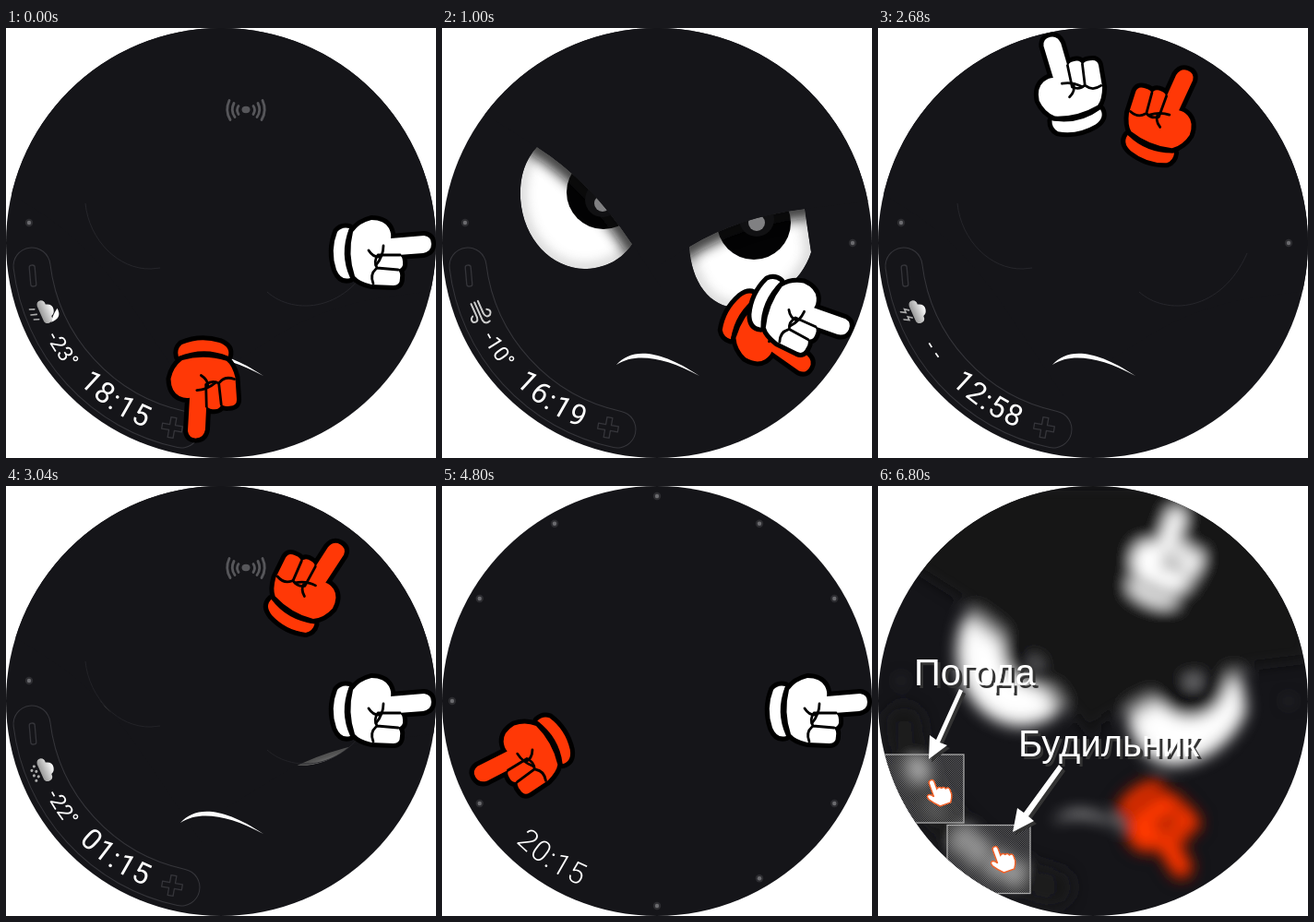
These frames come from a looping animation (466x466 px, 8.8 s). An HTML page:

```html
<!DOCTYPE html>
<html lang="ru">
<head>
<meta charset="utf-8">
<title>Watch face</title>
<style>
html, body { margin: 0; width: 100%; height: 100%; overflow: hidden; background: #fff; }
svg { display: block; width: 100vw; height: 100vh; }
.digits { font-family: Roboto, sans-serif; fill: #fff; text-anchor: middle; }
.label { font: 40px "Liberation Sans", Arial, sans-serif; }
</style>
</head>
<body>
<svg viewBox="0 0 466 466">
  <defs>
    <clipPath id="disc"><circle cx="233" cy="233" r="233" shape-rendering="crispEdges"/></clipPath>
    <filter id="soft" x="-30%" y="-30%" width="160%" height="160%"><feGaussianBlur stdDeviation="7"/></filter>
    <filter id="blur" filterUnits="userSpaceOnUse" x="0" y="0" width="466" height="466"><feGaussianBlur stdDeviation="8"/></filter>
    <linearGradient id="cloud" x2="0" y2="1"><stop offset="0" stop-color="#fff"/><stop offset="1" stop-color="#999"/></linearGradient>
    <pattern id="mesh" width="2" height="2" patternUnits="userSpaceOnUse">
      <path d="M0 0h1v1h-1zM1 1h1v1h-1z" fill="#999" fill-opacity=".6"/>
    </pattern>
    <path id="timeArc" d="M16.500 233A216.500 216.500 0 0 0 449.500 233"/>
    <path id="tempArc" d="M18 233A215 215 0 0 0 448 233"/>

    <!-- Glove pointing to twelve, around the dial centre -->
    <g id="glove" stroke="#000" stroke-linejoin="round" stroke-linecap="round">
      <g stroke-width="10" paint-order="stroke">
        <path d="M-16-139Q12-128 38-140Q41-130 29-125Q8-118-12-126Q-18-131-16-139Z"/>
        <path d="M-5-184L-8-220Q-7-228 1-228Q9-228 11-219L13-192Q14-197 20-197Q28-198 29-191Q31-195 38-194Q46-194 46-187L45-163Q42-150 36-145Q12-137-12-143Q-22-150-25-163Q-25-177-16-182Q-10-185-5-184Z"/>
      </g>
      <g fill="none" stroke-width="2.800">
        <path d="M13-194L13-170Q20-165 27-169L29-192M28-168Q34-161 44-165"/>
        <path d="M3-176Q14-176 24-168M15-173Q16-165 8-160"/>
      </g>
    </g>
    <path id="pointer" d="M-3 2V-11Q-3-14 0-14Q3-14 3-11V-3Q6-5 8-2Q11-3 12 0Q16-1 16 3V8Q15 12 12 16H0Q-5 11-9 5Q-11 1-8 0Q-5 0-3 4Z"/>
  </defs>

  <g clip-path="url(#disc)">
    <rect width="466" height="466" fill="#151519"/>
    <g id="scene">
      <g id="face">
        <g id="eyes"></g>
        <path d="M189 365C205 347 234 347 279 377C240 356 209 352 189 365Z" fill="#fff"/>
        <g fill="none" stroke-linecap="round">
          <path d="M28 258A206.500 206.500 0 0 0 190 435" stroke="#35353a" stroke-width="41"/>
          <path d="M28 258A206.500 206.500 0 0 0 190 435" stroke="#151519" stroke-width="39"/>
        </g>
        <g fill="none" stroke="#35353a" stroke-width="1.300">
          <rect x="-3" y="-11.500" width="6" height="23" rx="2.500" transform="translate(29 268.500) rotate(-5)"/>
          <path d="M-3-11h6v8h8v6h-8v8h-6v-8h-8v-6h8z" stroke-linejoin="round" transform="translate(180 433) rotate(10)"/>
        </g>
        <g id="link" fill="none" stroke="#56565a" stroke-width="2.800" stroke-linecap="round" transform="translate(260 88.500)">
          <ellipse rx="4.500" ry="3.700" fill="#56565a" stroke="none"/>
          <g id="waves"><path d="M8-4Q11 0 8 5M13-7Q17 1 12 8M18-10Q23 1 17 11"/></g>
          <use href="#waves" transform="scale(-1 1)"/>
        </g>
        <g id="weather" transform="translate(41 308) rotate(66)"></g>
        <text class="digits" font-size="23" letter-spacing=".7"><textPath id="temp" href="#tempArc" startOffset="18.900%"></textPath></text>
        <g id="sideDots"></g>
      </g>
      <g id="dots"></g>
      <text class="digits" font-size="32" letter-spacing="1.800"><textPath id="time" href="#timeArc" startOffset="31.300%"></textPath></text>
      <use id="hour" href="#glove" fill="#ff3806"/>
      <use id="minute" href="#glove" fill="#fff"/>
    </g>
    <g id="help">
      <g fill="url(#mesh)" stroke="#aaa" stroke-width="1.300">
        <rect x="-1" y="291" width="94" height="74"/>
        <rect x="75" y="367.500" width="90" height="74"/>
      </g>
      <g fill="#fff" stroke="#f0622a" stroke-width="1.500">
        <use href="#pointer" transform="translate(62 332) rotate(-20)"/>
        <use href="#pointer" transform="translate(131 404) rotate(-20)"/>
      </g>
      <g id="notes"></g>
    </g>
  </g>
</svg>
<script>
const LOOP = 8800;
const $ = id => document.getElementById(id);

// The cover is the part of the lid that slides over the eye, kept within its own half.
const eyes = [
  { shape: 'M103 129C88 145 84 165 85 185C88 230 120 262 157 261C178 260 196 250 206 234Q160 165 103 129Z',
    rim: 'M86 190C90 230 122 262 157 261L167 260', half: 'M0 0H237V466H0Z',
    lid: 'M3 66L103 129Q160 165 206 234L270 330', cover: 'L600 0L200 -200Z',
    pupil: [175, 178], glint: [174, 190], shift: [-69, 69] },
  { shape: 'M268 237C270 275 290 303 320 303C355 303 390 275 400 243L393 196Q320 205 268 237Z',
    rim: 'M283 286C312 312 372 308 400 244', half: 'M237 0H466V466H237Z',
    lid: 'M168 299L268 237Q320 205 393 196L493 184', cover: 'L493 -100L100 -100Z',
    pupil: [338, 211], glint: [341, 211], shift: [30, 94] }
];

$('eyes').innerHTML = eyes.map((e, i) => {
  const [x, y] = e.pupil, [gx, gy] = e.glint;
  return `<clipPath id="eye${i}"><path d="${e.shape}"/></clipPath>
  <clipPath id="half${i}"><path d="${e.half}"/></clipPath>
  <g clip-path="url(#eye${i})">
    <path d="${e.shape}" fill="#fff"/>
    <path d="${e.shape}" fill="none" stroke="#555" stroke-width="6" opacity=".5" filter="url(#soft)"/>
    <circle cx="${x}" cy="${y}" r="40" fill="#030304"/>
    <path id="shade${i}" d="${e.lid}" fill="none" stroke="#111" stroke-width="20" opacity=".8" filter="url(#soft)"/>
    <circle cx="${gx}" cy="${gy - 4}" r="19" fill="#111113"/>
    <circle cx="${gx}" cy="${gy}" r="9" fill="#808082"/>
  </g>
  <g clip-path="url(#half${i})"><path id="lid${i}" d="${e.lid}${e.cover}" fill="#151519"/></g>
  <path id="rim${i}" d="${e.rim}" fill="none" stroke="#26262b"/>`;
}).join('');

const dot = (x, y) => `<circle cx="${x}" cy="${y}" r="4.200" fill="#2c2c30"/><circle cx="${x}" cy="${y}" r="2.200" fill="#6a6a6e"/>`;
$('sideDots').innerHTML = dot(25, 211) + dot(445, 233);
let ring = '';
for (let h = 0; h < 12; h++) {
  const a = h * Math.PI / 6;
  if (h !== 7) ring += dot(233 + 222 * Math.sin(a), 233 - 222 * Math.cos(a));
}
$('dots').innerHTML = ring;

const note = `<text class="label" x="39" y="216">Погода</text>
  <text class="label" x="152" y="293">Будильник</text>
  <path d="M88 220L92 222L67 278L75 281L55 296L56 270L63 275Z"/>
  <path d="M196 302L200 306L163 358L169 363L146 375L151 349L158 354Z"/>`;
$('notes').innerHTML = `<g fill="#333" transform="translate(3 3)">${note}</g><g fill="#fff">${note}</g>`;

const cloud = '<path d="M-9 4Q-14 3-13-2Q-11-6-7-5Q-5-12 1-11Q6-10 7-6Q13-6 13-1Q13 4 8 4Z" fill="url(#cloud)"/>';
const strokes = (d, w = 1.6, color = '#aaa') => `<path d="${d}" fill="none" stroke="${color}" stroke-width="${w}" stroke-linecap="round"/>`;
const icons = {
  moon: '<path d="M2-15Q14-16 13-3Q7-7 2-15Z" fill="#fff"/>' + cloud + strokes('M-7 8l-2 5M-1 8l-2 6M5 8l-2 5'),
  wind: strokes('M-12-3H3Q9-4 7-9Q3-13 0-8M-12 1H9Q15 0 13-6M-12 5H4Q10 6 7 11Q3 13 1 9', 2, '#ccc'),
  storm: cloud + strokes('M-5 6l-3 4h4l-3 5M4 6l-3 4h4l-3 5'),
  snow: cloud + strokes('M-8 8v.1M-2 8v.1M4 8v.1M-5 12v.1M1 12v.1M7 12v.1', 3)
};

// Each state holds until the next one begins.
const states = [
  { at: 0, time: '18:15', temp: '-23°', icon: 'moon', link: true },
  { at: 1000, time: '16:19', temp: '-10°', icon: 'wind' },
  { at: 2000, time: '12:58', temp: '- -', icon: 'storm' },
  { at: 2920, time: '01:15', temp: '-22°', icon: 'snow', link: true },
  { at: 4000, time: '08:26', temp: '-15°', icon: 'snow' },
  { at: 4800, time: '20:15', dim: true },
  { at: 5800, time: '05:04', dim: true },
  { at: 6800, time: '05:04', temp: '- -', icon: 'snow', help: true }
];

const show = (id, on) => $(id).setAttribute('display', on ? 'inline' : 'none');
let current;

function apply(s) {
  const [h, m] = s.time.split(':').map(Number);
  $('time').textContent = s.time;
  $('time').setAttribute('font-weight', s.dim ? 300 : 400);
  $('temp').textContent = s.temp || '';
  $('weather').innerHTML = icons[s.icon] || '';
  show('face', !s.dim);
  show('dots', s.dim);
  show('link', s.link);
  show('help', s.help);
  $('hour').setAttribute('transform', `translate(233 233) rotate(${h * 30 + m / 2}) translate(0 15) scale(-1 1) rotate(9 3 -228)`);
  $('minute').setAttribute('transform', `translate(233 233) rotate(${m * 6})`);
  if (s.help) $('scene').setAttribute('filter', 'url(#blur)');
  else $('scene').removeAttribute('filter');
}

const steps = (t, from, to) => Math.max(0, Math.min(6, Math.floor((t - from) / (to - from) * 6 + 1e-6))) / 6;

function openness(t) {
  if (t < 2000) return steps(t, 8, 680);
  if (t < 2920) return 1 - steps(t, 2008, 2680);
  return steps(t, 2920, 3480);
}

function draw(t) {
  const s = states.filter(x => x.at <= t).pop();
  if (s !== current) apply(current = s);
  const shut = 1 - openness(t);
  eyes.forEach((e, i) => {
    const move = `translate(${e.shift.map(v => v * shut)})`;
    $('lid' + i).setAttribute('transform', move);
    $('shade' + i).setAttribute('transform', move);
    $('rim' + i).setAttribute('opacity', shut);
  });
}

const start = performance.now();
function frame() {
  draw((performance.now() - start) % LOOP);
  requestAnimationFrame(frame);
}
frame();
</script>
</body>
</html>
```
